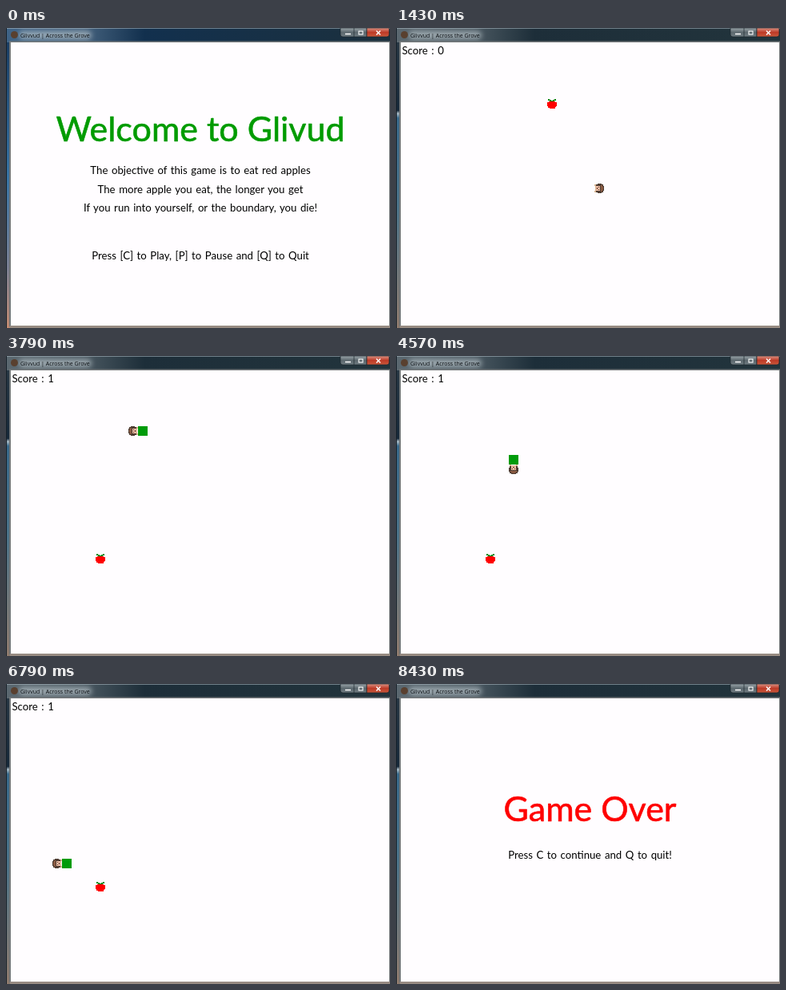
Write an HTML page that moves like this. It is 480x376 px and loops after 8.93 s.

```html
<!DOCTYPE html>
<html lang="en">
<head>
<meta charset="utf-8">
<title>Glivvud</title>
<style>
  html, body { margin: 0; width: 100%; height: 100%; overflow: hidden; background: #fffdff; }
  svg { display: block; width: 100vw; height: 100vh; }
  text { font-family: Lato, "Open Sans", sans-serif; }
  .line { font-size: 13.2px; word-spacing: 1.2px; fill: #000; }
  .big { font-size: 43px; stroke-width: .6; stroke-linejoin: round; }
  .mid { text-anchor: middle; }
  .green { fill: #009b00; stroke: #009b00; }
  .red { fill: #f00; stroke: #f00; }
  .caption { font: 7px "Open Sans", sans-serif; fill: #0a0e12; }
  .pixel { shape-rendering: crispEdges; }
  [hidden] { display: none; }
</style>
</head>
<body>
<svg viewBox="0 0 480 376" preserveAspectRatio="none">
  <defs>
    <linearGradient id="side" x2="0" y2="1">
      <stop offset="0" stop-color="#2b3a46"/>
      <stop offset=".275" stop-color="#162839"/>
      <stop offset=".285" stop-color="#a9bac4"/>
      <stop offset=".3" stop-color="#37688a"/>
      <stop offset=".6" stop-color="#4a7288"/>
      <stop offset="1" stop-color="#8f7a6c"/>
    </linearGradient>
    <linearGradient id="sideBlue" x2="0" y2="1">
      <stop offset="0" stop-color="#16375c"/>
      <stop offset=".5" stop-color="#3773a4"/>
      <stop offset=".8" stop-color="#7a7f92"/>
      <stop offset="1" stop-color="#c28a70"/>
    </linearGradient>
    <linearGradient id="bar">
      <stop offset="0" stop-color="#5b6870"/>
      <stop offset=".2" stop-color="#4b5962"/>
      <stop offset=".36" stop-color="#1d2e39"/>
      <stop offset="1" stop-color="#22343c"/>
    </linearGradient>
    <linearGradient id="barBlue">
      <stop offset="0" stop-color="#3f6386"/>
      <stop offset=".2" stop-color="#45627e"/>
      <stop offset=".36" stop-color="#12304e"/>
      <stop offset="1" stop-color="#1c303d"/>
    </linearGradient>
    <linearGradient id="button" x2="0" y2="1">
      <stop offset="0" stop-color="#9ba5aa"/>
      <stop offset=".5" stop-color="#5c686e"/>
      <stop offset="1" stop-color="#6f7c82"/>
    </linearGradient>
    <linearGradient id="closeButton" x2="0" y2="1">
      <stop offset="0" stop-color="#dd9384"/>
      <stop offset=".5" stop-color="#bd3a27"/>
      <stop offset="1" stop-color="#c9583b"/>
    </linearGradient>
    <filter id="blur" x="-20%" y="-100%" width="140%" height="300%"><feGaussianBlur stdDeviation="3"/></filter>
  </defs>

  <!-- window frame -->
  <rect id="side-strip" width="480" height="376"/>
  <rect id="title-bar" width="480" height="18"/>
  <rect x="1" width="479" height="1" fill="#a5b4bd" opacity=".6"/>
  <rect width="1" height="376" fill="#17222b"/>
  <rect x="16" y="4" width="91" height="10" rx="5" fill="#b9c5ca" opacity=".7" filter="url(#blur)"/>
  <circle cx="10.5" cy="8.5" r="4.5" fill="#59402f"/>
  <text class="caption" x="18" y="11.5">Glivvud | Across the Grove</text>
  <g stroke="#1c262b" stroke-width=".7">
    <path d="M418 0H451V11H421Q418 11 418 8Z" fill="url(#button)"/>
    <path d="M451 0H479V8Q479 11 476 11H451Z" fill="url(#closeButton)"/>
    <path d="M435 0V11"/>
  </g>
  <g fill="none" stroke="#fff" stroke-width="1.5">
    <path d="M424 7.5H431M463 3.5L468 8.5M468 3.5L463 8.5"/>
    <rect x="441" y="4" width="5" height="4" stroke-width="1.1"/>
  </g>
  <rect x="4" y="16.5" width="476" height="358" fill="#75797b"/>
  <rect x="5" y="373" width="475" height="3" fill="#978b82"/>
  <rect x="6" y="18" width="473" height="355" fill="#fffdff"/>

  <g id="welcome">
    <text class="big green mid" x="243" y="142">Welcome to Glivud</text>
    <g class="line mid">
      <text x="243" y="183">The objective of this game is to eat red apples</text>
      <text x="243" y="206.5">The more apple you eat, the longer you get</text>
      <text x="243" y="230">If you run into yourself, or the boundary, you die!</text>
      <text x="243" y="289.5">Press [C] to Play, [P] to Pause and [Q] to Quit</text>
    </g>
  </g>

  <g id="game" hidden>
    <text id="score" class="line" x="7.5" y="33"></text>
    <g id="apple" class="pixel">
      <path d="M-6-2H-4V-3H4V-2H6V3H5V4H4V6H-3V5H-5V3H-6Z" fill="#f00"/>
      <path d="M-5-6H-3V-5H-1V-4H1V-5H3V-6H5V-4H3V-3H-3V-4H-5Z" fill="#078a18"/>
    </g>
    <rect id="tail" class="pixel" x="-6" y="-6" width="12" height="12" fill="#009b0a"/>
    <g id="head" class="pixel">
      <path d="M-3-6H3V-5H5V-3H6V2H5V4H-5V2H-6V-3H-5V-5H-3Z" fill="#4e3c32"/>
      <path d="M-2-5H2V-4H4V-2H-4V-4H-2Z" fill="#8a5a42"/>
      <path d="M-3-1H3V4H-3Z" fill="#edbda4"/>
      <path d="M-2 0H-1V1H-2ZM1 0H2V1H1ZM-1 2H1V3H-1Z" fill="#5b3028"/>
      <path d="M-5 4H5V6H3V5H-3V6H-5Z" fill="#d8b493"/>
    </g>
  </g>

  <g id="over" hidden>
    <text class="big red mid" x="242.5" y="172">Game Over</text>
    <text class="line mid" x="242.5" y="219">Press C to continue and Q to quit!</text>
  </g>
</svg>
<script>
const LOOP = 8930, PLAY = 1320, EAT = 3460, OVER = 7240;
const CELL = 11.85, ORIGIN = { x: 254, y: 201 };
const DIRS = { R: [1, 0, 90], L: [-1, 0, -90], U: [0, -1, 0], D: [0, 1, 180] };

// Each run: time of its first step, interval, moves.
const RUNS = [
  [1420, 100, 'R'],
  [1575, 119, 'RR' + 'U'.repeat(9)],
  [2860, 100, 'L'.repeat(11) + 'DDDD'],
  [5440, 100, 'D'.repeat(7) + 'L'.repeat(11)]
];

const track = [{ time: PLAY, x: -1, y: 0, turn: 90 }];
for (const [start, tick, moves] of RUNS) {
  [...moves].forEach((move, i) => {
    const last = track[track.length - 1];
    const [dx, dy, turn] = DIRS[move];
    track.push({ time: start + i * tick, x: last.x + dx, y: last.y + dy, turn });
  });
}

const el = id => document.getElementById(id);
const show = (id, on) => el(id).toggleAttribute('hidden', !on);
const place = (id, x, y, turn = 0) =>
  el(id).setAttribute('transform', `translate(${Math.round(x)} ${Math.round(y)}) rotate(${turn})`);
const placeCell = (id, { x, y }, turn) =>
  place(id, ORIGIN.x + x * CELL, ORIGIN.y + y * CELL, turn);

function draw(t) {
  const intro = t < PLAY, over = t >= OVER;
  show('welcome', intro);
  show('game', !intro && !over);
  show('over', over);
  el('side-strip').setAttribute('fill', intro ? 'url(#sideBlue)' : 'url(#side)');
  el('title-bar').setAttribute('fill', intro ? 'url(#barBlue)' : 'url(#bar)');
  if (intro || over) return;

  const eaten = t >= EAT;
  const now = Math.max(0, track.filter(step => step.time <= t).length - 1);
  el('score').textContent = `Score : ${eaten ? 1 : 0}`;
  eaten ? place('apple', 118, 254) : place('apple', 195, 95);
  show('tail', eaten);
  placeCell('head', track[now], track[now].turn);
  placeCell('tail', track[Math.max(0, now - 1)]);
}

const begin = performance.now();
function frame() {
  draw((performance.now() - begin) % LOOP);
  requestAnimationFrame(frame);
}
frame();
</script>
</body>
</html>
```
